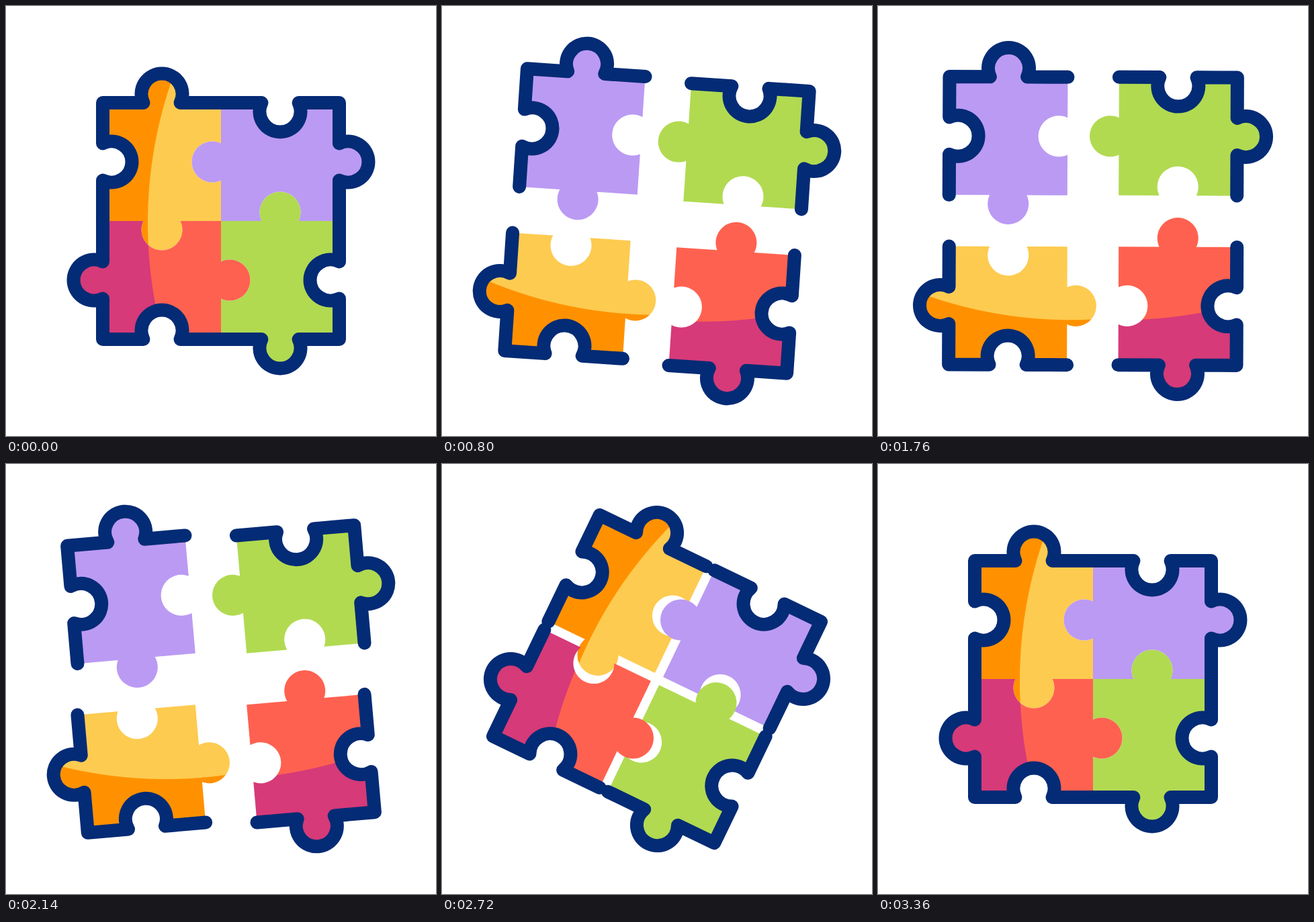
These frames come from a looping animation (640x640 px, 3620 ms). An HTML page:

```html
<!DOCTYPE html>
<html lang="en">
<head>
<meta charset="utf-8">
<title>Puzzle</title>
<style>
  html, body { margin: 0; height: 100%; overflow: hidden; background: #fff; }
  svg { display: block; width: 100%; height: 100%; }
  #rim { fill: none; stroke: #042b75; stroke-width: 20; stroke-linecap: round; stroke-linejoin: round; }
</style>
</head>
<body>
<svg viewBox="-320 -320 640 640">
  <defs>
    <path id="body" d="M0-176H-60.4A30.5 30.5 0 1 0-115.6-176H-176V-115.6A30.5 30.5 0 1 1-176-60.4V0H-115.6A30.5 30.5 0 1 0-60.4 0H0V-60.4A30.5 30.5 0 1 1 0-115.6Z"/>
    <path id="rim" d="M0-176H-60.4A30.5 30.5 0 1 0-115.6-176H-176V-115.6A30.5 30.5 0 1 1-176-60.4V0"/>
    <radialGradient id="amber" gradientUnits="userSpaceOnUse" cx="541" cy="3" r="1300">
      <stop offset=".4996" stop-color="#fdcb50"/><stop offset=".5004" stop-color="#ff9100"/>
    </radialGradient>
    <radialGradient id="coral" gradientUnits="userSpaceOnUse" cx="-3" cy="541" r="1300">
      <stop offset=".4996" stop-color="#ff6150"/><stop offset=".5004" stop-color="#d63a78"/>
    </radialGradient>
  </defs>
  <g class="piece" fill="url(#amber)"><use href="#body"/><use href="#rim"/></g>
  <g class="piece" fill="#bb9af3"><use href="#body"/><use href="#rim"/></g>
  <g class="piece" fill="#b1da51"><use href="#body"/><use href="#rim"/></g>
  <g class="piece" fill="url(#coral)"><use href="#body"/><use href="#rim"/></g>
</svg>
<script>
const LOOP = 3620, SPREAD = 38.2, TILT = -5, SWING = 9;
const pieces = document.querySelectorAll('.piece');

const phase = (t, start, length) => Math.min(1, Math.max(0, (t - start) / length));
const curve = (u, a, b) => 3 * (1 - u) ** 2 * u * a + 3 * (1 - u) * u * u * b + u ** 3;

// Bezier easing; y1 sets how fast it leaves
function ease(x, y1 = 0.167) {
  let lo = 0, hi = 1;
  for (let i = 0; i < 30; i++) {
    const mid = (lo + hi) / 2;
    if (curve(mid, 0.167, 0.1) < x) lo = mid; else hi = mid;
  }
  return curve(hi, y1, 1);
}

// turn: whole puzzle, open: how far apart (0..1), tilt: each piece
function pose(t) {
  if (t < 1400) {
    const open = ease(phase(t, 200, 1080));
    return { turn: -90 * open, open, tilt: TILT * open };
  }
  if (t < 2260) {
    const u = 1 - (1 - phase(t, 1400, 760)) ** 2;
    return { turn: -90, open: 1, tilt: TILT + SWING * Math.sin(Math.PI * u) ** 2 };
  }
  const x = phase(t, 2260, 1080);
  const open = 1 - ease(x);
  return { turn: -90 - 270 * ease(x, 0.6), open, tilt: TILT * open };
}

function draw(now) {
  const { turn, open, tilt } = pose(now % LOOP);
  const shift = -SPREAD * open;
  pieces.forEach((piece, i) => piece.setAttribute('transform',
    `rotate(${turn + 90 * i}) translate(${shift} ${shift}) rotate(${tilt})`));
}

const start = performance.now();
function tick() {
  draw(performance.now() - start);
  requestAnimationFrame(tick);
}
tick();
</script>
</body>
</html>
```
